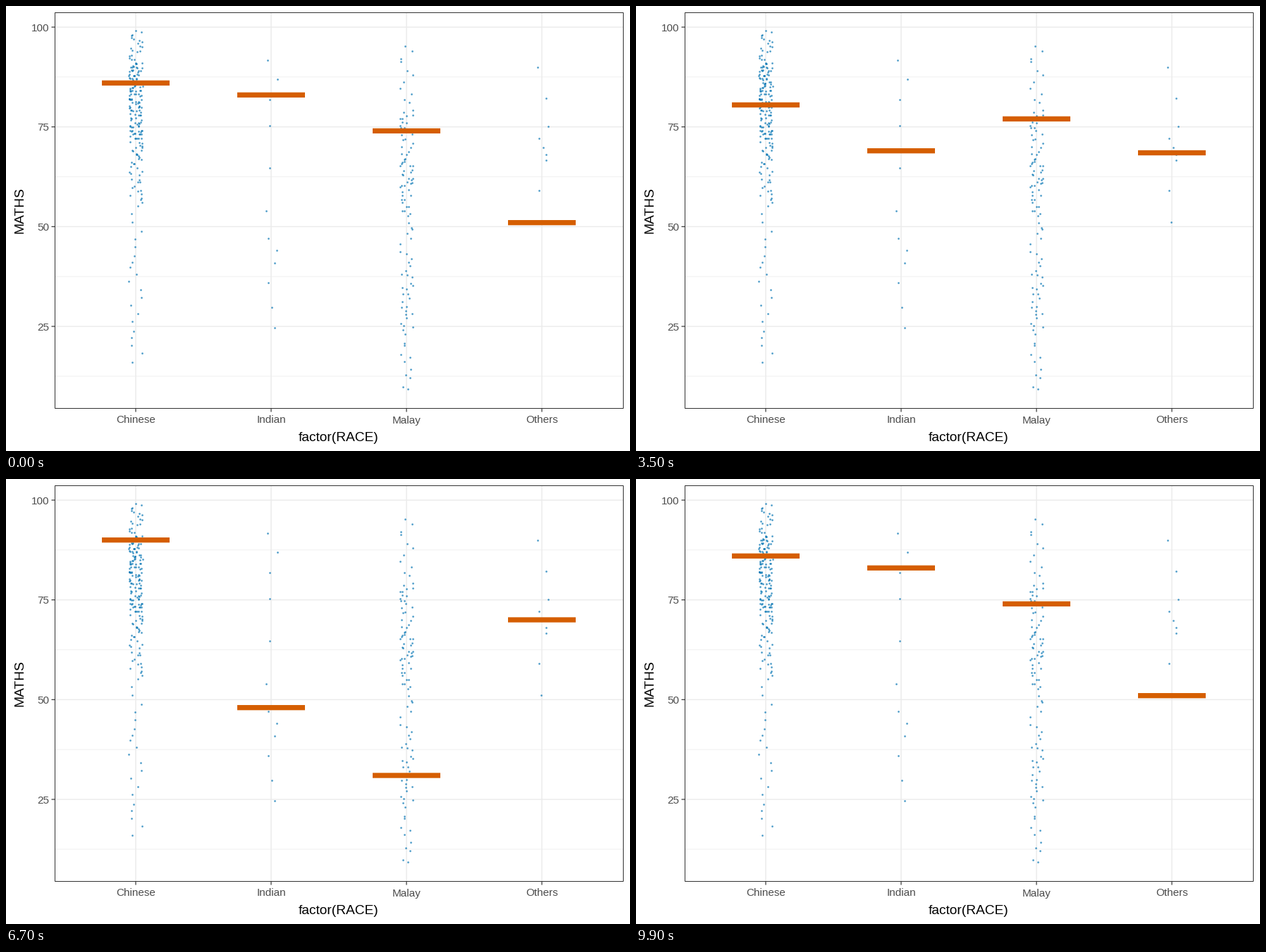
These frames come from a looping animation (885 by 632 pixels, 10000 ms). A matplotlib script:

```python
import matplotlib.pyplot as plt
import numpy as np
from matplotlib.animation import FuncAnimation

W, H, DPI = 885, 632, 100
PX = 72 / DPI                      # points per pixel
LEFT, RIGHT, TOP, BOTTOM = 69.5, 875.5, 9.5, 571.5
BLUE, ORANGE, GRID, DARK, GREY = "#0072B2", "#D55E00", "#EBEBEB", "#333333", "#4D4D4D"
GROUPS = {"Chinese": 184, "Indian": 376, "Malay": 568, "Others": 760}

# Number of students and evenly spaced quantiles of their scores
SCORES = {
    "Chinese": (205, [16, 56, 66, 72, 75, 79, 82, 85, 88, 91, 99]),
    "Indian": (12, [25, 40, 49, 78, 92]),
    "Malay": (112, [9, 24, 32, 40, 53, 59, 63, 67, 74, 79, 95]),
    "Others": (9, [51, 67, 70, 75, 90]),
}

# The score each group's bar shows, draw by draw
DRAWS = np.array([
    [86, 87, 87, 87, 80, 84, 98, 80, 83, 78, 74, 96, 63,
     90, 79, 59, 86, 90, 84, 78, 78, 85, 79, 79, 76],
    [83, 78, 40, 68, 48, 68, 42, 78, 90, 48, 48, 92, 42,
     35, 68, 42, 78, 48, 68, 78, 92, 35, 25, 25, 68],
    [74, 58, 83, 62, 45, 63, 60, 58, 75, 79, 72, 11, 65,
     63, 65, 74, 60, 31, 50, 21, 58, 65, 37, 62, 65],
    [51, 51, 70, 76, 67, 67, 67, 75, 70, 67, 67, 76, 75,
     67, 70, 61, 70, 70, 75, 70, 67, 75, 90, 70, 70],
]).T

plt.rcParams["font.family"] = "Liberation Sans"
plt.rcParams["path.snap"] = False


def score_y(score):
    return 30 + (100 - score) * 5.667


def line(x, y, color, width, z=1):
    return ax.plot(x, y, color=color, lw=width * PX, zorder=z,
                   solid_capstyle="butt")[0]


def label(x, y, text, size, color, **kw):
    ax.text(x, y, text, fontsize=size * PX, color=color, va="baseline", **kw)


def jittered_dots(name, rng):
    n, quantiles = SCORES[name]
    scores = np.interp(np.linspace(0, 1, n),
                       np.linspace(0, 1, len(quantiles)), quantiles).round()
    x = GROUPS[name] + rng.uniform(-9.6, 9.6, n)
    return x, score_y(scores + rng.uniform(-0.3, 0.3, n))


fig = plt.figure(figsize=(W / DPI, H / DPI), dpi=DPI, facecolor="white")
ax = fig.add_axes([0, 0, 1, 1])
ax.set(xlim=(0, W), ylim=(H, 0))
ax.axis("off")

for score in (87.5, 62.5, 37.5, 12.5):
    line([LEFT, RIGHT], [score_y(score)] * 2, GRID, 0.7)
for score in (100, 75, 50, 25):
    y = score_y(score)
    line([LEFT, RIGHT], [y, y], GRID, 1.4)
    line([LEFT - 5, LEFT], [y, y], DARK, 1.2, 4)
    label(61, y + 5.5, str(score), 15.3, GREY, ha="right")

rng = np.random.default_rng(12)
for name, x in GROUPS.items():
    line([x, x], [TOP, BOTTOM], GRID, 1.4)
    line([x, x], [BOTTOM, BOTTOM + 5], DARK, 1.2, 4)
    label(x, 592.5, name, 15.3, GREY, ha="center")
    ax.scatter(*jittered_dots(name, rng), s=(2.7 * PX) ** 2, color=BLUE,
               alpha=0.7, lw=0, zorder=2)

ax.add_patch(plt.Rectangle((LEFT, TOP), RIGHT - LEFT, BOTTOM - TOP, fill=False,
                           ec=DARK, lw=PX, zorder=5))
label(472, 618, "factor(RACE)", 19.1, "black", ha="center")
label(24.5, 290.5, "MATHS", 19.1, "black", ha="center", rotation=90,
      rotation_mode="anchor")

bars = [line([x - 48, x + 48], [0, 0], ORANGE, 7.3, 3) for x in GROUPS.values()]


def update(frame):
    # Three held frames, then one halfway; the hold at 4.8 s is a frame shorter
    k, phase = divmod(frame + (frame >= 50), 4)
    now, following = DRAWS[k % len(DRAWS)], DRAWS[(k + 1) % len(DRAWS)]
    scores = (now + following) / 2 if phase == 3 else now
    for bar, score in zip(bars, scores):
        bar.set_ydata([score_y(score)] * 2)
    return bars


anim = FuncAnimation(fig, update, frames=100, interval=100, repeat=True, blit=False)
plt.show()
```
